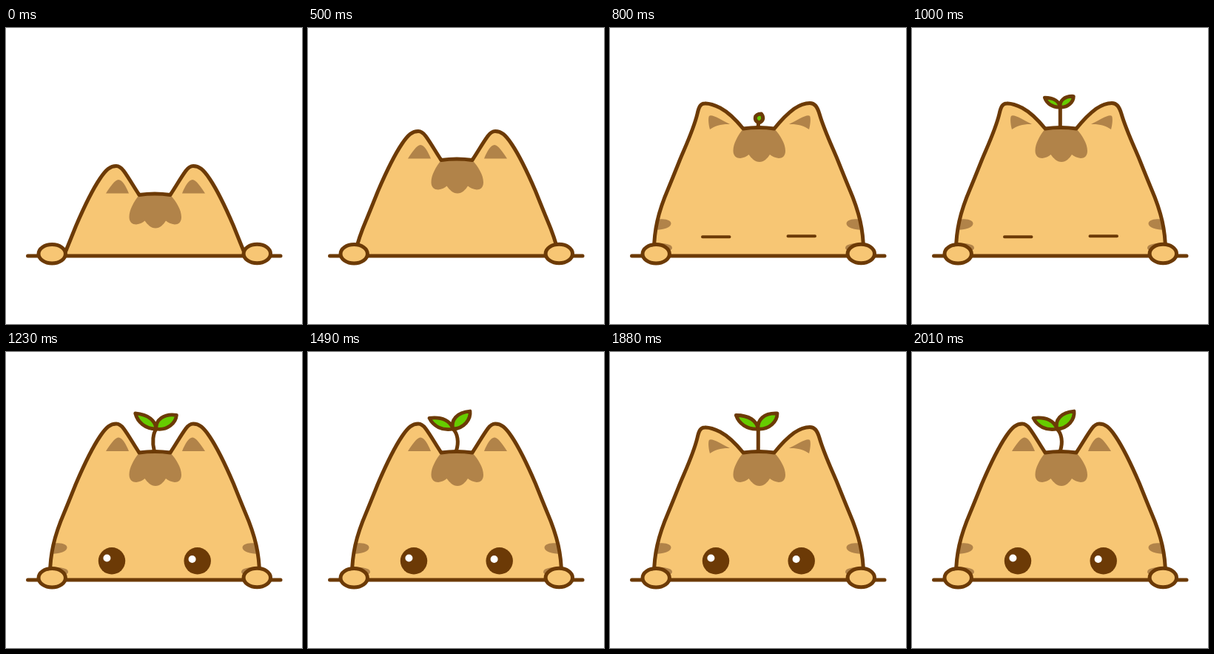
Write an HTML page that moves like this. It is 400 by 400 pixels and loops after 2140 ms.

```html
<!DOCTYPE html>
<html lang="en">
<head>
<meta charset="utf-8">
<title>Peeking cat</title>
<style>
html, body { margin: 0; width: 100%; height: 100%; overflow: hidden; background: #fff; }
svg { display: block; width: 100vw; height: 100vh; }
.ink { stroke: #6c3a06; stroke-width: 5; stroke-linecap: round; stroke-linejoin: round; fill: none; }
.ink.fur, .fur { fill: #f7c674; }
.mark { fill: #b18349; }
.leaf { fill: #66cc00; }
.thin { stroke-width: 4; }
.eye { fill: #6c3a06; }
.shine { fill: #fff; }
</style>
</head>
<body>
<svg viewBox="0 0 400 400">
  <defs>
    <clipPath id="above"><rect width="400" height="308"/></clipPath>
    <clipPath id="inside"><path id="bodyClip"/></clipPath>
    <path id="innerEar"/>
    <g id="stripes">
      <path d="M56 259C66 258 82 257 82.500 264C82.500 270 72 273 56 273Z"/>
      <path d="M56 291C68 290 84 291 84 297C84 302 72 304 56 304Z"/>
    </g>
  </defs>
  <g clip-path="url(#above)">
    <g id="head">
      <path id="body" class="fur"/>
      <g class="mark">
        <use href="#innerEar"/>
        <use href="#innerEar" transform="matrix(-1 0 0 1 404 0)"/>
        <g clip-path="url(#inside)">
          <use href="#stripes"/>
          <use href="#stripes" transform="matrix(-1 0 0 1 402 0)"/>
        </g>
        <path d="M180 136C173 145 166.500 156 166.500 166C166.500 173 171 176 176 176C181 175.500 185 173.500 187.500 171C191 176 196 181 202 181C208 181 213 176 216 171C219 173.500 223 175.500 228 176C233 176 237 173 237 166C237 156 230 145 222 136Z"/>
      </g>
      <path id="outline" class="ink"/>
      <path id="shut" class="ink thin" d="M125 282.300H161.500M240.500 281.300H277"/>
      <g id="open">
        <circle class="eye" cx="143" cy="282.300" r="18.200"/>
        <circle class="eye" cx="258.700" cy="282.300" r="18.200"/>
        <circle class="shine" cx="136.400" cy="278.500" r="5"/>
        <circle class="shine" cx="251.600" cy="280" r="5"/>
      </g>
      <path id="stem" class="ink"/>
      <path id="bud" class="ink leaf" d="M201 128C194 124.500 194.500 116.500 204.500 116C208.500 121 207 126.500 201 128Z"/>
      <g id="leaves" class="ink">
        <path class="leaf" d="M0 0C-2 -11 -12 -18.500 -30 -18.500C-26 -7 -15 1 0 0Z"/>
        <path class="leaf" d="M0 0C-2 -12 8 -22 25.700 -21C25.700 -10 15 1 0 0Z"/>
      </g>
    </g>
  </g>
  <path class="ink" d="M29.500 308H371"/>
  <ellipse class="ink fur" cx="62.200" cy="305.300" rx="18.200" ry="12.700"/>
  <ellipse class="ink fur" cx="339.300" cy="305" rx="18.200" ry="12.700"/>
</svg>
<script>
const $ = id => document.getElementById(id);
const LOOP = 2140;

// Points run from the foot of the flank up to the crown; right sides are mirrored.
const flank = [[59.5, 410], [59.5, 300], [59.7, 274], [64.5, 250], [78.7, 217], [83.7, 205], [89.7, 190], [94.5, 178]];
const upSide = [[103.5, 157], [115.5, 131], [127, 114], [135.5, 101.5], [141, 97], [149, 97],
                [153, 97], [156, 99.5], [159, 103.5], [166, 113], [172, 124], [180, 136]];
const outSide = [[101.5, 161], [113, 137], [118, 116], [120, 107], [122, 102], [128, 102],
                 [134, 101.5], [141, 104], [149, 108], [162, 115], [171, 125], [180, 136]];
const outRight = [[101.5, 161], [113, 137], [119, 116], [122, 106], [125.5, 101.5], [132, 101.5],
                  [139, 101.5], [147, 105], [153, 109], [164, 117], [172, 126], [180, 136]];
const ears = {
  up: {
    head: headPath(upSide, upSide),
    inner: "M135 134C141 125 147 115.500 152 115.500C157 115.500 162 124 166 134Z"
  },
  out: {
    head: headPath(outSide, outRight),
    inner: "M135 137C133 130 132.500 121 134 119C137 115.500 152 125 162 130C151 129.500 142 132 135 137Z"
  }
};

function headPath(leftSide, rightSide) {
  const left = flank.concat(leftSide);
  const right = flank.concat(rightSide).map(([x, y]) => [402 - x, y]).reverse();
  return "M" + left[0] + "L" + left[1] + "C" + left.slice(2).join(" ") +
    "Q201 133 " + right[0] + "C" + right.slice(1, -1).join(" ") + "L" + right.at(-1);
}

// Leaf base x, y, tilt, scale, and the bend of the stem.
const sprouts = {
  bud:    { x: 200.5, y: 128, bend: 0 },
  small:  { x: 200.3, y: 115, tilt: 0, scale: 0.45, bend: 0 },
  medium: { x: 200.3, y: 107, tilt: 0, scale: 0.7, bend: 0 },
  mid:    { x: 200.3, y: 104, tilt: 0, scale: 1, bend: 0 },
  right:  { x: 203, y: 104, tilt: 5, scale: 1, bend: -3 },
  left:   { x: 196, y: 104, tilt: -7, scale: 1, bend: 4 }
};

// start, drop, ears, eyes, sprout
const steps = [
  [0, 89.5, "up", "", ""],
  [500, 42.5, "up", "", ""],
  [600, 0, "up", "shut", ""],
  [700, 0, "out", "shut", ""],
  [800, 0, "out", "shut", "bud"],
  [900, 0, "out", "shut", "small"],
  [1000, 0, "out", "shut", "medium"],
  [1100, 0, "out", "open", "mid"],
  [1230, 0, "up", "open", "right"],
  [1360, 0, "out", "open", "mid"],
  [1490, 0, "up", "open", "left"],
  [1620, 0, "out", "open", "mid"],
  [1750, 0, "up", "open", "right"],
  [1880, 0, "out", "open", "mid"],
  [2010, 0, "up", "open", "left"]
];

const show = (id, on) => $(id).setAttribute("visibility", on ? "visible" : "hidden");

function drawSprout(name) {
  const s = sprouts[name];
  show("stem", s);
  show("bud", name === "bud");
  show("leaves", s && s.scale);
  if (!s) return;
  $("stem").setAttribute("d", `M200.300 133.500C${200.3 + s.bend} 122 ${(200.3 + s.x) / 2 + s.bend} 110 ${s.x} ${s.y}`);
  if (name === "bud") $("stem").setAttribute("d", `M200.300 133.500L${s.x} ${s.y}`);
  if (!s.scale) return;
  $("leaves").setAttribute("transform", `translate(${s.x} ${s.y}) rotate(${s.tilt}) scale(${s.scale})`);
  $("leaves").style.strokeWidth = 4.8 / s.scale;
}

function draw([, drop, ear, eyes, sprout]) {
  const pose = ears[ear];
  $("head").setAttribute("transform", `translate(0 ${drop})`);
  for (const id of ["body", "bodyClip", "outline"]) $(id).setAttribute("d", pose.head);
  $("innerEar").setAttribute("d", pose.inner);
  show("shut", eyes === "shut");
  show("open", eyes === "open");
  drawSprout(sprout);
}

let current;
function tick() {
  const t = performance.now() % LOOP;
  const step = steps.filter(s => s[0] <= t).pop();
  if (step !== current) draw(current = step);
  requestAnimationFrame(tick);
}
tick();
</script>
</body>
</html>
```
